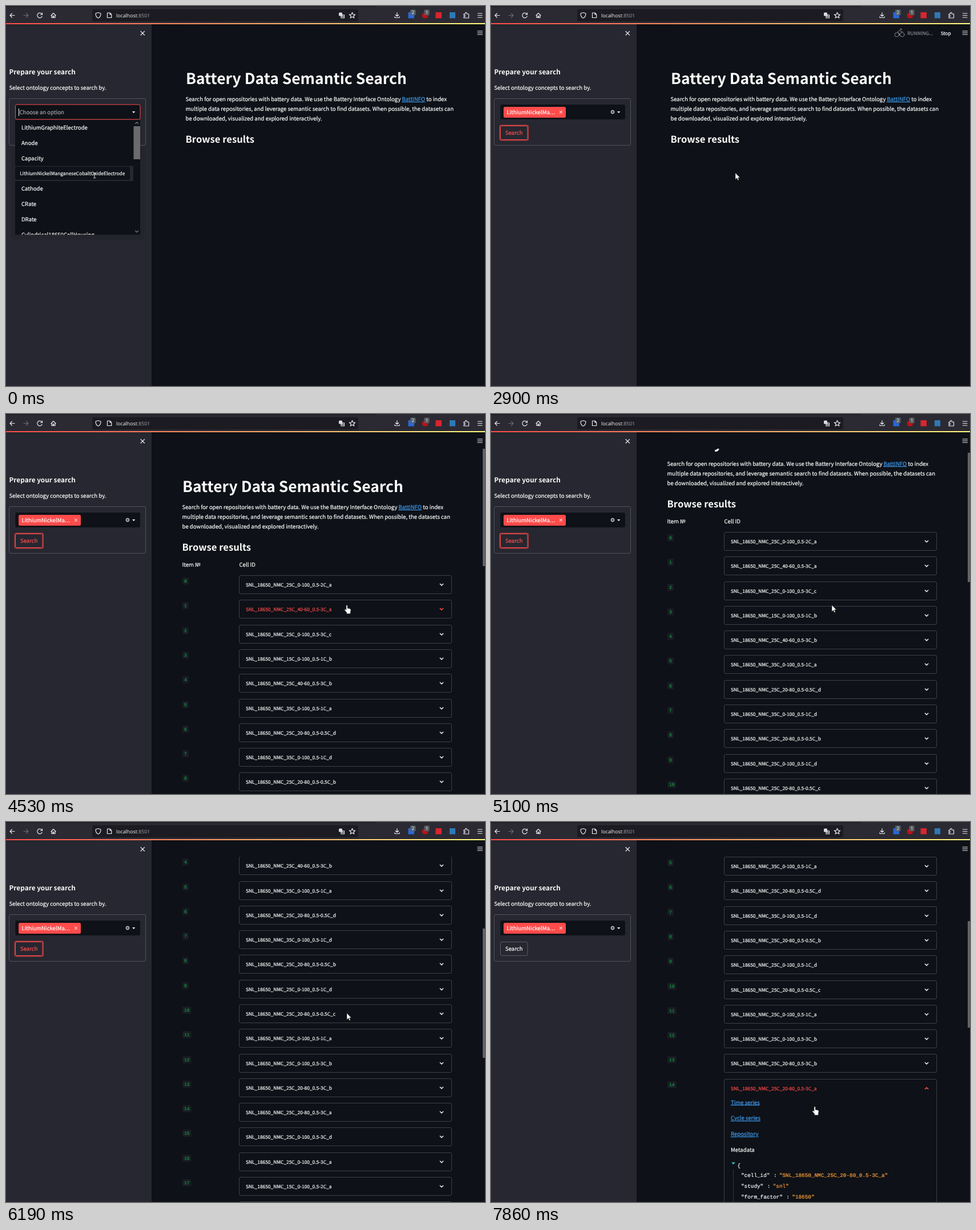
Write an HTML page that moves like this. It is 839x667 px and loops after 7990 ms.

```html
<!DOCTYPE html>
<html lang="en">
<head>
<meta charset="utf-8">
<title>Battery Data Semantic Search</title>
<style>
  html, body { margin: 0; width: 100%; height: 100%; overflow: hidden; background: #0e1117; }
  svg { display: block; width: 839px; height: 667px; }
  text { font: 9.59px 'Noto Sans CJK JP', 'Noto Sans CJK SC', 'Noto Sans', sans-serif; color: #fafafa; white-space: pre; text-rendering: geometricPrecision; }
  text, tspan { fill: currentColor; stroke: currentColor; stroke-width: .22px; }
  .title { font-size: 26.43px; font-weight: 700; stroke: none; }
  .h2 { font-size: 16.65px; font-weight: 600; stroke: none; }
  .h3 { font-size: 11.8px; font-weight: 600; stroke: none; }
  .small { font-size: 8.38px; }
  .link { color: #3d9df3; text-decoration: underline; }
  .mono { font: 9.33px 'Liberation Mono', monospace; }
  .num { font: 8px 'Liberation Mono', monospace; color: #0b9a3a; }
  .url { font: 8.8px 'Open Sans', sans-serif; stroke: none; }
  .badge { font: 8px 'Open Sans', sans-serif; text-anchor: middle; stroke: none; }
  .muted { color: #85878d; }
  .hint { color: #a3a4a8; }
  .line { fill: none; stroke: #e8e8ee; stroke-width: 1.2; stroke-linecap: round; stroke-linejoin: round; }
  .box { fill: #0e1117; stroke: #3d4047; }
  .hot text.small { color: #ff4b4b; }
  .hot .line { stroke: #ff4b4b; }
  .str { color: #f99e37; }
  #search rect { fill: #262730; stroke: #5a5b64; }
  #search.hot rect, #search.focus rect { stroke: #ff4b4b; }
  #search.hot text, #search.focus text { color: #ff4b4b; }
  #search .ring { fill: none; stroke: none; }
  #search.focus .ring { stroke: #ff4b4b; stroke-opacity: .6; stroke-width: 1.5; }
</style>
</head>
<body>
<svg viewBox="0 0 839 667">
  <defs>
    <linearGradient id="deco"><stop stop-color="#ff4b4b"/><stop offset="1" stop-color="#fffd80"/></linearGradient>
    <clipPath id="pageClip"><rect x="255" y="61" width="584" height="606"/></clipPath>
    <clipPath id="listClip"><rect x="16" y="200" width="219" height="201.5"/></clipPath>
  </defs>
  <rect width="839" height="667" fill="#0e1117"/>

  <g clip-path="url(#pageClip)">
    <g id="page">
      <text class="title" x="315" y="136.5">Battery Data Semantic Search</text>
      <text x="314.5" y="167">Search for open repositories with battery data. We use the Battery Interface Ontology <tspan class="link">BattINFO</tspan> to index</text>
      <text x="314.5" y="184">multiple data repositories, and leverage semantic search to find datasets. When possible, the datasets can</text>
      <text x="314.5" y="201">be downloaded, visualized and explored interactively.</text>
      <text class="h2" x="314.5" y="239.7">Browse results</text>
      <g id="results">
        <text x="314.5" y="268">Item №</text>
        <text x="414.5" y="268">Cell ID</text>
      </g>
    </g>
    <rect id="thumb" x="835" width="4" fill="#636367"/>
  </g>
  <g id="running">
    <g class="line" style="stroke:#85878d;stroke-width:1">
      <circle cx="710.8" cy="50.3" r="3.7"/><circle cx="720.2" cy="50.3" r="3.7"/>
      <path d="M715.5 51.5V48.5L712 45.5L716 42.5L718 45H721"/><circle cx="718" cy="40.7" r="1.1"/>
    </g>
    <text class="small muted" x="729.3" y="50.7">RUNNING...</text>
    <text class="small" x="787.7" y="50.7">Stop</text>
  </g>
  <path class="line" d="M826 44H834.5M826 47H834.5M826 50H834.5"/>

  <rect y="31" width="255" height="636" fill="#262730"/>
  <path class="line" d="M236 44.5L242.5 51M242.5 44.5L236 51"/>
  <text class="h3" x="5.5" y="120.3">Prepare your search</text>
  <text x="5.5" y="146.5">Select ontology concepts to search by.</text>
  <rect x="5.5" y="162.5" width="239" height="82" rx="2.5" fill="none" stroke="#50515a"/>
  <g id="search">
    <rect class="ring" x="15.3" y="209.3" width="50" height="26.4" rx="3"/>
    <rect x="16.5" y="210.5" width="47.5" height="24" rx="2.5"/>
    <text x="25" y="226.4">Search</text>
  </g>
  <rect id="select" x="16.5" y="173" width="218.5" height="26" rx="2.5" fill="#0e1117"/>
  <g id="empty">
    <path d="M22.5 180V193" stroke="#fafafa"/>
    <text class="hint" x="23.5" y="190">Choose an option</text>
  </g>
  <g id="chip">
    <rect x="22" y="177" width="109" height="19" rx="2.5" fill="#ff4b4b"/>
    <text x="27.5" y="190">LithiumNickelMa<tspan letter-spacing=".7">...</tspan></text>
    <path class="line" d="M120.5 184.3L124.3 188.1M124.3 184.3L120.5 188.1"/>
    <circle cx="213" cy="186" r="3.4" fill="#a3a4a8"/>
    <path d="M211.8 184.8L214.2 187.2M214.2 184.8L211.8 187.2" stroke="#0e1117"/>
  </g>
  <path d="M221 185H226.4L223.7 188Z" fill="#fafafa"/>

  <g id="list">
    <rect x="8" y="246" width="235" height="164" rx="6" fill="#000" opacity=".08"/>
    <rect x="16" y="200" width="219" height="201.5" fill="#0e1117"/>
    <g clip-path="url(#listClip)">
      <rect id="mark" x="16" width="207" height="26.5" fill="#262730"/>
      <g id="options"></g>
    </g>
    <rect id="listThumb" x="223.5" y="211" width="11.5" fill="#6b6b6e"/>
    <path class="line" style="stroke:#77787c" d="M226.7 206.5L229.2 204L231.7 206.5M226.7 394.5L229.2 397L231.7 394.5"/>
    <g id="tip">
      <rect x="16" y="282" width="201" height="23" rx="2.5" fill="#0e1117"/>
      <text class="small" x="24.3" y="297">LithiumNickelManganeseCobaltOxideElectrode</text>
    </g>
  </g>

  <g id="browser">
    <rect width="839" height="31" fill="#2b2a33"/>
    <rect width="648" height="1.5" fill="#1c1b22"/>
    <rect x="151" y="5.5" width="466" height="21.5" rx="3" fill="#1c1b22"/>
    <rect y="30" width="839" height="2" fill="url(#deco)"/>
    <path class="line" d="M15 16.5H7M10.5 13L7 16.5L10.5 20M63 14.5A4.3 4.3 0 1 0 63.2 18M63.5 12V15H60.5M79 16.5L83 12.5L87 16.5M80 16V20.5H86V16M82.2 20.5V17.5H83.8V20.5"/>
    <path class="line" style="stroke:#6c6b74" d="M31 16.5H39M35.5 13L39 16.5L35.5 20"/>
    <path class="line" d="M161.5 11.5L166 13C166 17.5 164.5 20 161.5 21.2C158.5 20 157 17.5 157 13ZM177.5 12H182L184.7 14.7V20.5H177.5ZM182 12V14.7H184.7"/>
    <text class="url" x="193" y="20">localhost<tspan class="url hint">:8501</tspan></text>
    <rect x="583" y="11.5" width="6" height="6" rx="1" fill="#d7d7dd"/>
    <path class="line" d="M587 15.5H592.5V21H587ZM584.5 13.5H587.5M588.5 19L589.7 17L591 19"/>
    <path class="line" d="M606.5 11.3L608 14.8L611.7 15L608.8 17.5L609.8 21L606.5 19L603.2 21L604.2 17.5L601.3 15L605 14.8Z"/>
    <path class="line" d="M685 11.5V18M682.3 15.5L685 18L687.7 15.5M681 18.5V20.5H689V18.5"/>
    <rect x="704.5" y="11" width="10.5" height="10.5" fill="#2a67d8"/>
    <circle cx="734" cy="16.5" r="5.3" fill="#b5121b"/>
    <rect x="752.5" y="11" width="10.5" height="10.5" fill="#d9252e"/>
    <rect x="777" y="11" width="10" height="10.5" fill="#2f78b7"/>
    <rect x="708" y="6.5" width="9.5" height="9.5" rx="1" fill="#53636d"/>
    <rect x="732.5" y="6.5" width="9" height="9.5" rx="1" fill="#5b5b62"/>
    <text class="badge" x="712.7" y="14.3">2</text>
    <text class="badge" x="737" y="14.3">1</text>
    <path class="line" d="M802 14H804.5C803.5 10.5 808 10.5 807.2 14H810.5V21H802V18.5C805 19.3 805 15.8 802 16.5Z"/>
    <path class="line" d="M826.5 13H834M826.5 16.5H834M826.5 20H834"/>
  </g>

  <g id="cursor">
    <path id="arrow" d="M0 0V11.5L2.7 9L4.5 13L6.3 12.2L4.5 8.3H8Z" fill="#fff" stroke="#111" stroke-width=".5"/>
    <path id="hand" transform="scale(1.08)" d="M-1 .8Q0 -.8 1.1 .8V5L5 5.8Q6.7 6.3 6.5 8L5.8 11V14H-.3V12L-3.6 8Q-3.8 6.2 -2 6.8L-1 8Z" fill="#fff" stroke="#111" stroke-width=".4"/>
    <path id="beam" d="M-2 -4Q0 -4 0 -3Q0 -4 2 -4M0 -3V4M-2 5Q0 5 0 4Q0 5 2 5" fill="none" stroke="#ddd"/>
  </g>
</svg>
<script>
const LOOP = 7990, PITCH = 43.29, OPEN_ROW = 14;
const $ = id => document.getElementById(id);
const show = (id, on) => { $(id).style.display = on ? '' : 'none'; };
const set = (id, attrs) => { for (const k in attrs) $(id).setAttribute(k, attrs[k]); };

const cells = ['25C_0-100_0.5-2C_a', '25C_40-60_0.5-3C_a', '25C_0-100_0.5-3C_c', '15C_0-100_0.5-1C_b',
  '25C_40-60_0.5-3C_b', '35C_0-100_0.5-1C_a', '25C_20-80_0.5-0.5C_d', '35C_0-100_0.5-1C_d',
  '25C_20-80_0.5-0.5C_b', '25C_0-100_0.5-1C_d', '25C_20-80_0.5-0.5C_c', '25C_0-100_0.5-1C_a',
  '25C_0-100_0.5-3C_b', '25C_20-80_0.5-3C_b', '25C_20-80_0.5-3C_a', '25C_0-100_0.5-3C_d',
  '25C_0-100_0.5-3C_a', '15C_0-100_0.5-2C_a', '15C_0-100_0.5-1C_a', '35C_0-100_0.5-2C_b'];

const links = ['Time series', 'Cycle series', 'Repository'].map((s, i) =>
  `<text class="link" x="426" y="${28 + i * 27.8}">${s}</text>`).join('');
const json = [['cell_id', 'SNL_18650_NMC_25C_20-80_0.5-3C_a'], ['study', 'snl'], ['form_factor', '18650']]
  .map(([key, value], i) => {
    const x = 444 + (key.length + 2) * 5.6, y = 155 + i * 19.2;
    return `<text class="mono" x="444" y="${y}">"${key}"</text><text class="mono" x="${x + 6.5}" y="${y}">:</text>
      <text class="mono str" x="${x + 16.5}" y="${y}">"${value}"</text>`;
  }).join('');
const details = `<g id="details">${links}<text x="426" y="111.5">Metadata</text>
  <path d="M427 130H434L430.5 133.5Z" fill="#3fc4cf"/><text class="mono" x="437.5" y="138">{</text>
  <path d="M430.5 142V400" stroke="#33363d"/>${json}</g>`;

$('results').innerHTML += cells.map((cell, i) => `<g id="row${i}">
  <rect x="315" y="-12.5" width="${i > 9 ? 15.5 : 11}" height="12.5" rx="2" fill="#1a1c24"/>
  <text class="num" x="318" y="-3.5">${i}</text>
  <rect id="box${i}" class="box" x="414.5" y="-16" width="372" height="32" rx="2.5"/>
  <text class="small" x="426" y="3.5">SNL_18650_NMC_${cell}</text>
  <path id="chevron${i}" class="line" style="stroke-width:1.5" d="M766.3 -1.3L769 1.4L771.7 -1.3"/>
  ${i === OPEN_ROW ? details : ''}</g>`).join('');

const concepts = ['LithiumGraphiteElectrode', 'Anode', 'Capacity', 'Cathode', 'CRate', 'DRate',
  'Cylindrical18650CellHousing', 'CelsiusTemperature'];
$('options').innerHTML = concepts.map((name, i) =>
  `<text id="option${i}" x="27" y="0">${name}</text>`).join('');

// Screen updates: first moment, spacing, count
const bursts = [[0, 130, 2], [560, 134, 6], [1500, 140, 6], [2490, 136.6, 8], [3590, 160, 2],
  [4020, 170, 4], [4960, 136, 10], [6330, 144, 6], [7210, 162, 5]];
function tick(t) {
  const [start, step, count] = bursts.filter(b => b[0] <= t).pop();
  return start + step * Math.min(count - 1, Math.floor((t - start) / step));
}

const pointer = [[0, 155, 297], [560, 155, 297], [1230, 193, 113], [1500, 193, 113], [2200, 42, 224],
  [2490, 42, 224], [2899, 428, 293], [4020, 428, 293], [4530, 597, 335.5], [6474, 597, 335.5],
  [6906, 567, 467], [7210, 567, 467], [7858, 567, 499.5]];
const scrolling = [[0, 0], [4824, 0], [5640, 228.5], [6184, 396], [6474, 438.5]];
function along(keys, t) {
  const i = keys.findIndex(k => k[0] > t);
  if (i < 0) return keys[keys.length - 1].slice(1);
  const a = keys[i - 1], b = keys[i], p = (t - a[0]) / (b[0] - a[0]);
  return a.slice(1).map((v, n) => v + (b[n + 1] - v) * p);
}

function render(time) {
  const t = tick(time);
  const [x, y] = along(pointer, t), [scroll] = along(scrolling, t);
  const picked = t >= 560, listOpen = t < 1500, full = t >= 4020, opened = t >= 7050;

  show('list', listOpen);
  show('empty', !picked);
  show('chip', picked);
  show('tip', !picked);
  $('tip').style.opacity = t < 130 ? .95 : 1;
  set('select', { stroke: listOpen ? '#ff4b4b' : 'none' });
  const hovered = y < 200 ? 0 : Math.floor((y - 200) / 26.9);
  set('mark', { y: 200 + hovered * 26.9 });
  set('listThumb', { height: picked ? 61 : 58 });
  concepts.forEach((_, i) => set('option' + i, { y: Math.round(216.8 + 26.87 * (i + (!picked && i > 2 ? 1 : 0))) }));

  const onSearch = !listOpen && x > 15 && x < 65 && y > 209 && y < 235;
  $('search').classList.toggle('hot', onSearch);
  $('search').classList.toggle('focus', t >= 2490 && !opened);
  show('running', t >= 2490 && t < 4020);

  set('page', { transform: `translate(${full ? -6 : 0} ${-scroll})` });
  show('results', t >= 3590);
  show('thumb', full);
  set('thumb', { y: Math.round(40 + scroll * (opened ? .306 : .371)), height: opened ? 187 : 227 });

  const canHover = full && (t < 4960 || t >= 6474);
  const rowCount = full ? cells.length : t >= 3750 ? 3 : 1;
  let onRow = false;
  cells.forEach((_, i) => {
    // Keep box edges on whole screen pixels
    const center = Math.floor(299.6 + PITCH * i - scroll) + .5 + scroll;
    const isOpen = opened && i === OPEN_ROW;
    const hot = isOpen || canHover && !opened && x > 408 && Math.abs(y + scroll - center) < 16;
    onRow = onRow || hot;
    show('row' + i, i < rowCount);
    set('row' + i, {
      transform: `translate(0 ${center + (opened && i > OPEN_ROW ? 400 : 0)})`,
      class: hot ? 'hot' : ''
    });
    set('box' + i, { height: isOpen ? 420 : 32 });
    set('chevron' + i, { transform: isOpen ? 'scale(1 -1)' : '' });
  });
  show('details', opened);

  const hand = onSearch || onRow;
  set('cursor', { transform: `translate(${x} ${y})` });
  show('beam', !picked);
  show('hand', hand);
  show('arrow', picked && !hand);
}

function frame(now) {
  render(now % LOOP);
  requestAnimationFrame(frame);
}
render(0);
requestAnimationFrame(frame);
</script>
</body>
</html>
```
